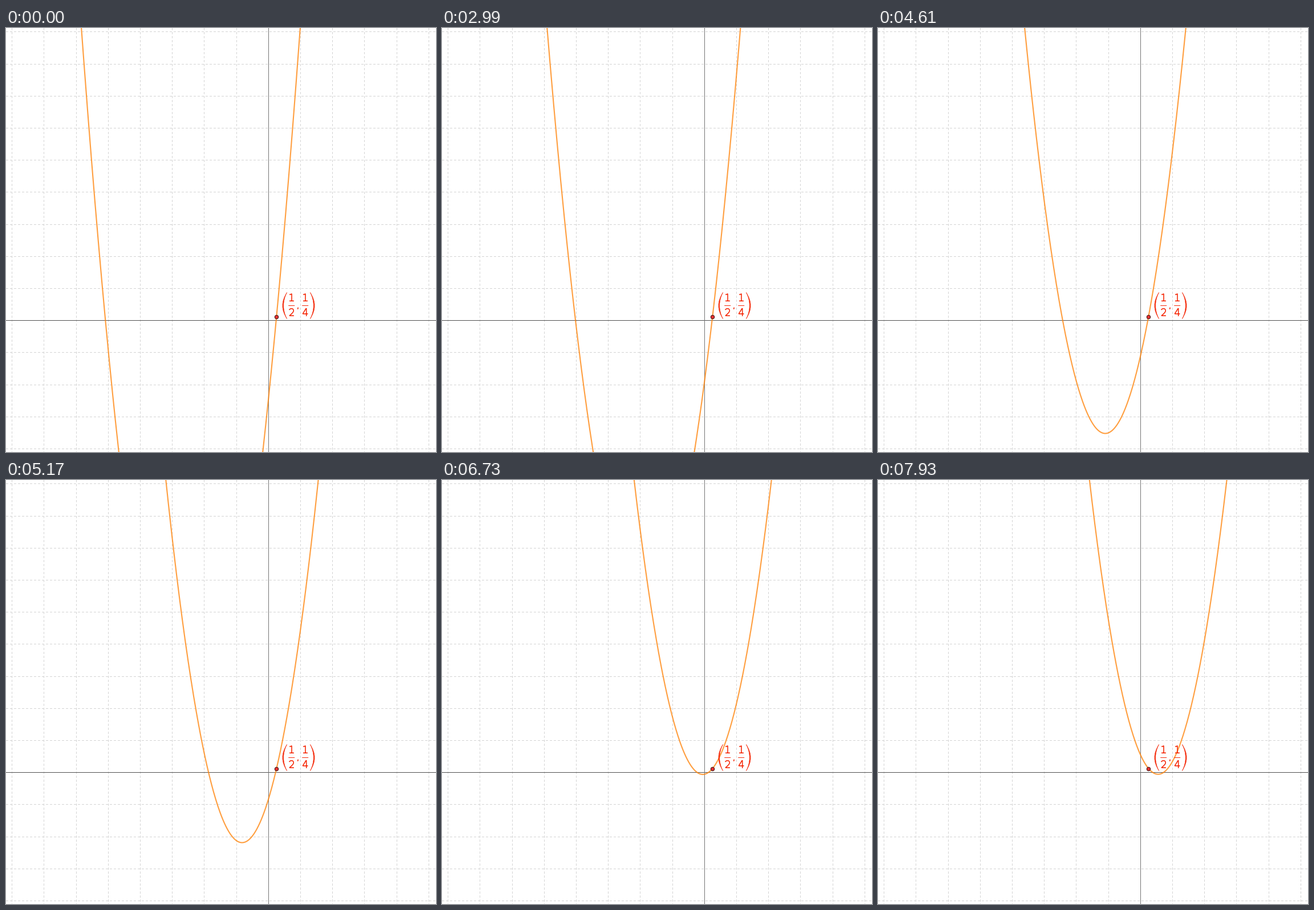
Animation of 754x743 px, one loop 7.99 s. Source, as a matplotlib script:

```python
import numpy as np
import matplotlib.pyplot as plt
from matplotlib.animation import FuncAnimation
from matplotlib.path import Path
from matplotlib.patches import PathPatch

W, H, DPI = 754, 743, 128
PX = 72 / DPI                      # points per pixel
OX, OY, UNIT = 460.3, 512.6, 28.1  # origin and pixels per unit
FRAMES, STEP_MS = 235, 34
RED = "#f52a0a"

fig = plt.figure(figsize=(W / DPI, H / DPI), dpi=DPI, facecolor="white")
ax = fig.add_axes([0, 0, 1, 1])
ax.set_xlim(0, W)
ax.set_ylim(H, 0)
ax.axis("off")


def rule(x, y, color, z, **kw):
    ax.plot(x, y, color=color, lw=PX, zorder=z, snap=False,
            solid_capstyle="butt", **kw)


def mid(v):
    return np.floor(v) + 0.5


# grid every two units, then the axes
dash = dict(dashes=(4, 3), dash_capstyle="butt")
for k in range(-8, 6):
    if k:
        x = mid(OX + 2 * UNIT * k)
        rule([x, x], [0, H], "#d4d4d4", 1, **dash)
for k in range(-9, 5):
    if k:
        y = mid(OY + 2 * UNIT * k)
        rule([0, W], [y, y], "#d4d4d4", 1, **dash)
rule([0, W], [mid(OY)] * 2, "#505050", 2)
rule([mid(OX)] * 2, [0, H], "#747474", 2)

curve, = ax.plot([], [], color="#ff7f00", alpha=0.75, lw=2.1 * PX, zorder=3)
ax.plot(OX + UNIT / 2, OY - UNIT / 4, "o", ms=6.4 * PX, mfc="#e63232",
        mec="#3a1010", mew=PX, zorder=5, snap=False)

# pen strokes of the label, as (points, path codes) in pixels above baseline
M, L, C = Path.MOVETO, Path.LINETO, Path.CURVE4
STROKES = {
    "1": ([(-3.6, 12), (-1.6, 12.1), (0.3, 13.3), (0.3, 0.7),
           (-3.7, 0.7), (4.2, 0.7)], [M, L, L, L, M, L]),
    "2": ([(-4, 10.9), (-2.6, 14.2), (3.5, 14.4), (3.5, 9.7),
           (3.5, 6.8), (0.4, 4.5), (-3.7, 0.8), (4.2, 0.8)],
          [M, C, C, C, C, C, C, L]),
    "4": ([(2, 0), (2, 13.3), (1.3, 13.3), (-4.4, 4.1), (4.8, 4.1)],
          [M, L, L, L, L]),
    ",": ([(0, 1.4), (0, 0), (-0.6, -1.8)], [M, L, L]),
}


def glyph(x, y, s):
    pts, codes = STROKES[s]
    path = Path([(x + u, y - v) for u, v in pts], codes)
    ax.add_patch(PathPatch(path, fc="none", ec=RED, lw=1.6 * PX, zorder=4,
                           capstyle="butt", joinstyle="miter", snap=False))


def paren(tip, side):
    top, bottom, axis = 463.5, 509.5, 486.5
    pts = [(tip, top), (tip + side * 15.5, axis), (tip, bottom),
           (tip + side * 11.8, axis), (tip, top)]
    codes = [M] + [Path.CURVE3] * 4
    ax.add_patch(PathPatch(Path(pts, codes), fc=RED, ec=RED,
                           lw=0.5 * PX, zorder=4))


def fraction(x, top, bottom):
    glyph(x, 479, top)
    glyph(x, 505, bottom)
    rule([x - 5.5, x + 5.5], [486.5, 486.5], RED, 4)


paren(492.6, -1)
fraction(500.7, "1", "2")
glyph(512, 491, ",")
fraction(524.7, "1", "4")
paren(533.4, 1)

# moments at which the slider moves, and its value after each move
MOVES = np.arange(1, 90)
TIMES = np.floor(np.interp(
    MOVES, [1, 13, 25, 37, 49, 61, 73, 85, 89],
    [1950, 2780, 3610, 4420, 5240, 6050, 6850, 7670, 7930]) / 10) * 10
X = np.linspace(-17, 14, 700)


def slider(n):
    return np.interp(n, [0, 1, 16, 24, 31, 48, 89],
                     [9.7, 9.63, 7.58, 6.58, 5.64, 3.3, -2.2])


def update(i):
    t = (i + 1) * STEP_MS
    a = slider(np.searchsorted(TIMES, t, side="right"))
    y = X**2 + a * X - a / 2       # always passes through (1/2, 1/4)
    curve.set_data(OX + UNIT * X, OY - UNIT * y)
    return curve,


anim = FuncAnimation(fig, update, frames=FRAMES, interval=STEP_MS,
                     repeat=True, repeat_delay=0, blit=False)
plt.show()
```
